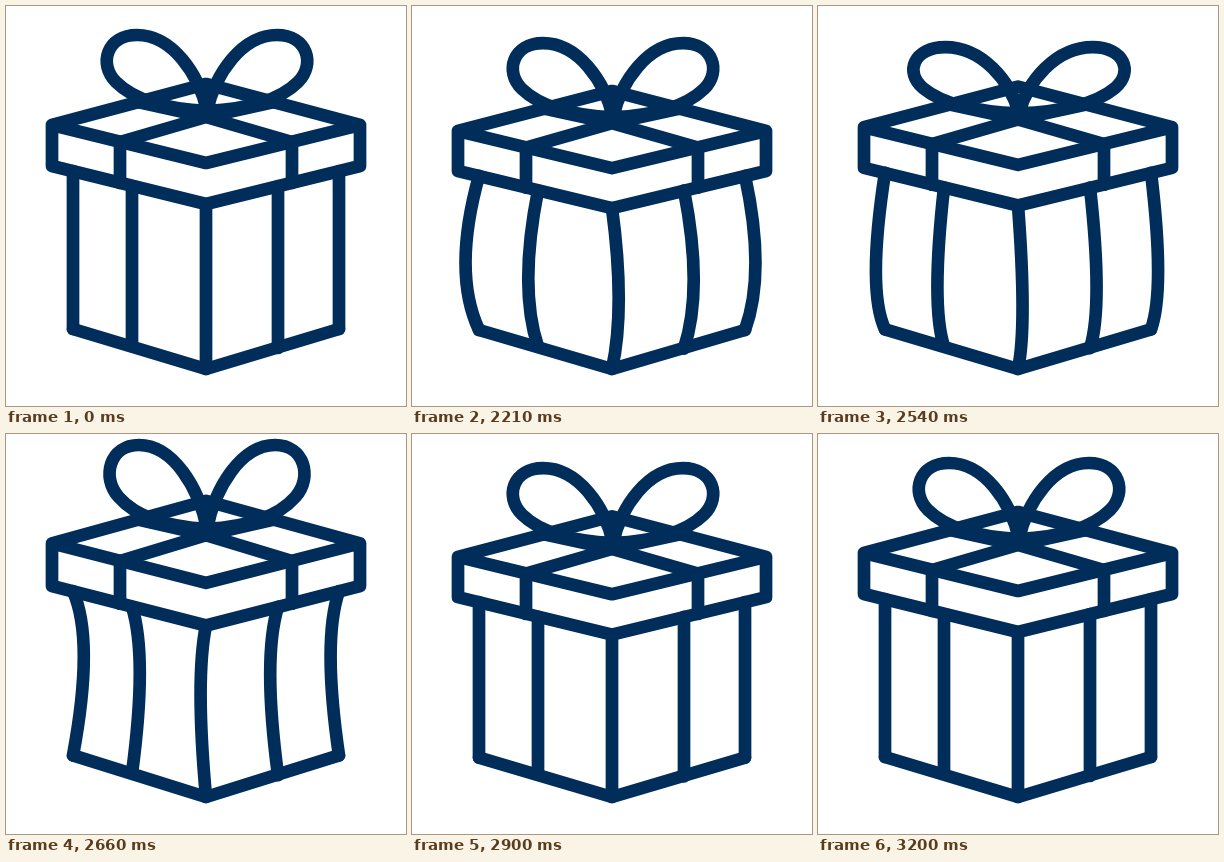
Recreate the animation shown at these times as an HTML page. Size 400 by 400 pixels, loop 3.23 s.

```html
<!DOCTYPE html>
<html lang="en">
<head>
<meta charset="utf-8">
<title>Gift box</title>
<style>
  html, body { margin: 0; height: 100%; overflow: hidden; background: #fff; }
  svg { display: block; width: 100%; height: 100%; }
  path {
    fill: none; stroke: #002d5a; stroke-width: 12.7;
    stroke-linecap: round; stroke-linejoin: round;
    vector-effect: non-scaling-stroke;
  }
</style>
</head>
<body>
<svg viewBox="0 0 400 400">
  <g id="box">
    <path id="sides"/>
    <path d="M67 323L200 363L333 323"/>
    <path d="M46 119L200 78L354 119L200 157ZV160L200 198L354 160V119"/>
    <path d="M114 177V136L200 111L268 96M286 177V136L200 111L132 96"/>
    <g id="bow">
      <path id="loop" d="M201 105C193 68 166 29 131 29C101 29 92 58 110 76C129 95 160 103 201 105"/>
      <use href="#loop" transform="matrix(-1 0 0 1 402 0)"/>
    </g>
  </g>
</svg>
<script>
const LOOP = 3230, START = 2030, STEP = 30;
const [box, bow, sides] = ['box', 'bow', 'sides'].map(id => document.getElementById(id));

const clamp = u => Math.min(1, Math.max(0, u));
const wave = u => Math.cos(Math.PI * u);
const swell = u => (1 - wave(clamp(u))) / 2;
const easeIn = u => u * u;
const easeOut = u => Math.sin(u * Math.PI / 2);
const mix = (a, b, u) => a + (b - a) * u;

// The box sinks, then swings up and down until it settles.
function boxHeight(t) {
  const depth = t < 2430
    ? swell((t - 2000) / 430)
    : wave((t - 2430) / 250) * (1 - swell((t - 2430) / 770));
  return 1 - .051 * depth;
}

// The bow is flattened by the upward jump and recoils around it.
const bowHeight = t => 1 - .12 * wave((t - 2540) / 130) * Math.exp(-(((t - 2540) / 150) ** 2));

// The walls bulge out, snap inwards and straighten.
function wallBulge(t) {
  const inward = -.6;
  if (t < 2390) return easeOut(clamp((t - 2000) / 390));
  if (t < 2660) return mix(1, inward, easeIn((t - 2390) / 270));
  return mix(inward, 0, easeOut(clamp((t - 2660) / 240)));
}

// A wall edge; a weak bulge sits nearer the floor.
function edge(x, top, bottom, reach, bulge) {
  const shift = 80 * Math.sign(bulge) * (1 - Math.abs(bulge));
  return `M${x} ${top}Q${x + 2 * reach * bulge} ${(top + bottom) / 2 + shift} ${x} ${bottom}`;
}

function scaleAbout(node, x, y, sx, sy) {
  node.setAttribute('transform', `translate(${x} ${y}) scale(${sx} ${sy}) translate(${-x} ${-y})`);
}

function draw(now) {
  const ms = now % LOOP;
  const t = ms < START ? 0 : START + Math.floor((ms - START) / STEP) * STEP;
  const stretch = bowHeight(t), bulge = wallBulge(t);
  scaleAbout(box, 200, 363, 1, boxHeight(t));
  scaleAbout(bow, 201, 105, 1 - (stretch - 1) * .45, stretch);
  sides.setAttribute('d',
    edge(67, 165, 323, -18, bulge) + edge(126, 180, 340, -13, bulge) +
    edge(200, 198, 363, 9, bulge) +
    edge(272, 180, 342, 13, bulge) + edge(333, 165, 323, 14, bulge));
  requestAnimationFrame(draw);
}
requestAnimationFrame(draw);
</script>
</body>
</html>
```
